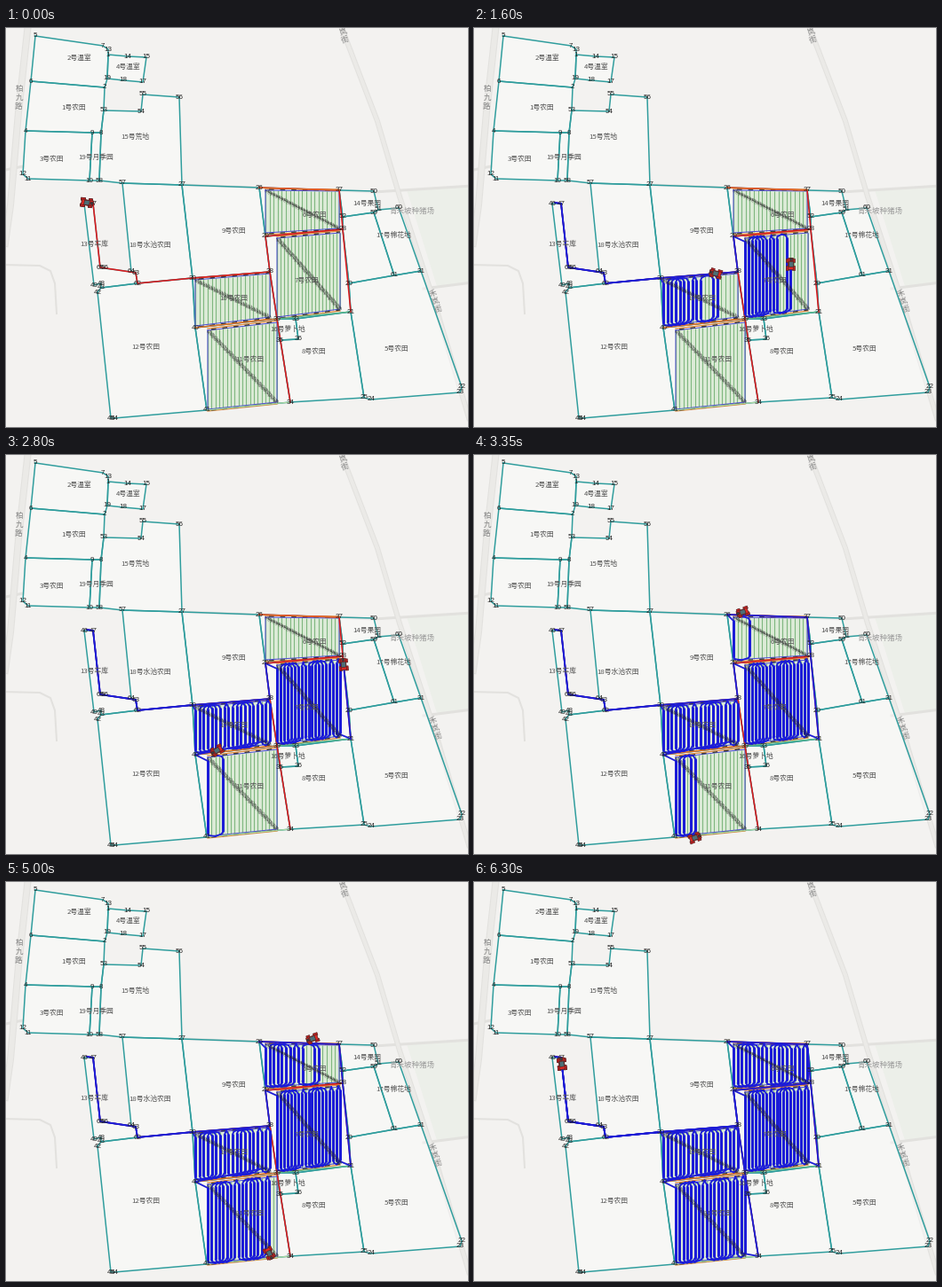
Write a matplotlib script that moves like this. It is 520 px wide and 450 px high and loops after 6.35 s.

```python
import numpy as np
import matplotlib.pyplot as plt
from matplotlib.animation import FuncAnimation
from matplotlib.collections import LineCollection, PolyCollection

W, H, DPI = 520, 450, 100
STEP, FRAMES = 50, 127
PX = 72 / DPI
CJK = "Noto Sans CJK JP"
TEAL, RED, BLUE = "#2f9d9d", "#dc1a1e", "#1c1cd8"
PASSES, BLOCK = 19, 8

NORTH = {
    5: (33, 9), 7: (109, 20), 13: (115, 24), 1: (115, 30), 14: (137, 32),
    15: (158, 33), 17: (154, 61), 18: (132, 59), 19: (114, 57), 2: (111, 67),
    6: (28, 60), 53: (110, 93), 54: (152, 94), 55: (154, 75), 56: (195, 78),
    4: (22, 116), 9: (97, 118), 8: (107, 118), 12: (19, 165), 11: (25, 170),
    10: (94, 172), 58: (105, 172), 57: (131, 175), 27: (198, 177),
    26: (285, 180), 37: (375, 183), 50: (414, 184), 51: (419, 205),
    59: (414, 208), 60: (442, 203), 52: (379, 213), 28: (379, 227),
}
SOUTH = {
    46: (88, 198), 47: (98, 198), 65: (106, 270), 66: (111, 271),
    64: (141, 275), 63: (146, 276), 62: (148, 288), 48: (107, 288),
    49: (99, 290), 43: (107, 293), 42: (103, 298), 45: (118, 440),
    44: (122, 440), 41: (226, 431), 30: (210, 282), 38: (297, 275),
    29: (292, 235), 40: (213, 338), 39: (305, 328), 33: (326, 328),
    36: (329, 351), 35: (308, 352), 34: (320, 422), 25: (403, 417),
    24: (411, 419), 23: (511, 411), 22: (513, 405), 31: (467, 274),
    61: (437, 279), 20: (386, 288), 21: (388, 320),
}
NODES = {**NORTH, **SOUTH}

PLOTS = [
    "5 7 13 1 19 2 6", "1 14 15 17 18 19", "6 2 53 8 9 4", "4 9 10 11 12",
    "9 8 58 10", "53 54 55 56 27 57 58 8", "57 27 30 62 63 64",
    "46 47 65 66 64 63 62 43 48 49", "42 43 62 30 40 41 44 45",
    "27 26 29 38 30", "30 38 39 40", "40 39 34 41", "26 37 52 28 29",
    "29 28 20 21 33 39 38", "37 50 51 59 52", "59 51 60 31 61",
    "52 59 61 20 28", "20 61 31 22 23 24 25 21", "39 35 36 33 21 25 34",
    "33 39 35 36",
]
ROUTES = ["47 65 63 62 30 38 39 34", "38 29 28", "26 37 28 21"]

NAMES = [
    ("2号温室", 82, 34), ("4号温室", 138, 44), ("1号农田", 76, 90),
    ("15号荒地", 145, 123), ("3号农田", 51, 148), ("19号月季园", 101, 146),
    ("9号农田", 256, 229), ("18号水池农田", 162, 245), ("13号车库", 99, 244),
    ("12号农田", 157, 360), ("10号农田", 256, 305), ("11号农田", 274, 374),
    ("7号农田", 338, 285), ("6号农田", 347, 211), ("8号农田", 346, 365),
    ("5号农田", 440, 362), ("14号果园", 406, 198), ("17号棉花地", 436, 234),
    ("16号萝卜地", 317, 340),
]

# corners: top left, top right, bottom left, bottom right
F10 = np.array([(213, 284), (297, 277), (213, 336), (297, 326)], float)
F11 = np.array([(227, 341), (305, 332), (227, 430), (305, 422)], float)
F7 = np.array([(305, 237), (376, 231), (305, 326), (376, 317)], float)
F6 = np.array([(292, 183), (375, 184), (292, 231), (375, 226)], float)


def nodes(text):
    return np.array([NODES[int(n)] for n in text.split()], float)


def pass_order():
    """Interleave each block so that turns skip half of its rows."""
    order = []
    for s in range(0, PASSES, BLOCK):
        m = min(BLOCK, PASSES - s)
        half = (m + 1) // 2
        for k in range(half):
            order += [s + k] + ([s + k + half] if k + half < m else [])
    return order


def row(field, k):
    tl, tr, bl, br = field
    u = k / (PASSES - 1)
    return tl + (tr - tl) * u, bl + (br - bl) * u


def sweep(field):
    """Vertices (x, y, marker shift, line width): five per pass with its turn."""
    pts = []
    order = pass_order()
    for i, k in enumerate(order):
        a, b = row(field, k)
        side = 1 if i % 2 == 0 else -1
        if side < 0:
            a, b = b, a
        pts += [(a[0], a[1] + 4 * side, 0, 3.0), (b[0], b[1] - 4 * side, 0, 1.8)]
        if i + 1 < len(order):
            c = row(field, order[i + 1])[side > 0]
            d = 1.5 * np.sign(c[0] - b[0])
            mid = (b + c) / 2
            pts += [(b[0] + d, b[1] - side, 3 * side, 1.8),
                    (mid[0], mid[1] + side, 6 * side, 1.8),
                    (c[0] - d, c[1] - side, 3 * side, 1.8)]
    return pts


def travel(text):
    return [(x, y, 0, 1.8) for x, y in nodes(text)]


class Machine:
    def __init__(self, pts, keys, ax):
        self.pts = np.array(pts, float)
        xy = self.pts[:, :2]
        self.dist = np.r_[0, np.cumsum(np.hypot(*np.diff(xy, axis=0).T))]
        times, verts = np.array(keys, float).T
        self.times = times
        self.marks = np.interp(verts, np.arange(len(pts)), self.dist)
        self.segs = np.stack([xy[:-1], xy[1:]], axis=1)
        self.trail = LineCollection([], colors=BLUE, zorder=6, capstyle="round",
                                    linewidths=self.pts[:-1, 3] * PX)
        ax.add_collection(self.trail)
        self.icon = PolyCollection([], zorder=12, linewidths=0.6 * PX,
                                   facecolors=ICON_COLORS, edgecolors="#4a2020")
        ax.add_collection(self.icon)

    def update(self, t):
        d = np.interp(t, self.times, self.marks)
        i = min(np.searchsorted(self.dist, d, side="right") - 1, len(self.segs) - 1)
        x, y, shift = (np.interp(d, self.dist, self.pts[:, c]) for c in range(3))
        segs = list(self.segs[:i])
        if d > 0:
            segs.append(np.array([self.pts[i, :2], (x, y)]))
        self.trail.set_segments(segs)
        dx, dy = self.segs[i][1] - self.segs[i][0]
        n = np.hypot(dx, dy) or 1
        rot = np.array([[dx, dy], [-dy, dx]]) / n
        self.icon.set_verts([p @ rot + (x, y + shift) for p in ICON])


def box(x0, y0, x1, y1):
    return np.array([(x0, y0), (x1, y0), (x1, y1), (x0, y1)], float)


ICON = [box(-7, -5, -2, -2), box(-7, 2, -2, 5), box(2, -5, 6, -2), box(2, 2, 6, 5),
        box(-6, -3, 7, 3), box(-3, -2.5, 3, 2.5), box(4, -1.5, 7, 1.5)]
ICON_COLORS = ["#c81e1e"] * 4 + ["#dd2a24", "#4c6f76", "#3b3b40"]

fig = plt.figure(figsize=(W / DPI, H / DPI), dpi=DPI, facecolor="#f3f2f0")
ax = fig.add_axes([0, 0, 1, 1])
ax.set_xlim(0, W)
ax.set_ylim(H, 0)
ax.axis("off")


def line(pts, color, width, z, **kw):
    x, y = np.array(pts, float).T
    ax.plot(x, y, color=color, lw=width * PX, zorder=z, **kw)


def label(x, y, text, size, color, z, **kw):
    ax.text(x, y, text, fontsize=size * PX, color=color, zorder=z,
            ha="center", va="center", **kw)


def street(name, x, y, dx, dy, angle):
    for i, ch in enumerate(name):
        label(x + i * dx, y + i * dy, ch, 8.5, "#858585", 3,
              family=CJK, rotation=angle)


# base map
ax.fill([452, 520, 520, 486], [183, 180, 287, 292], color="#ecefe9", zorder=0)
for pts, width in [([(25, -5), (14, 95), (5, 200), (-2, 250)], 8),
                   ([(376, -5), (418, 105), (443, 190), (484, 315), (524, 450)], 6),
                   ([(-5, 161), (19, 156)], 3),
                   ([(198, 177), (414, 185), (525, 178)], 3),
                   ([(-5, 267), (38, 268), (50, 274), (55, 288), (57, 322)], 2),
                   ([(470, 294), (525, 287)], 3)]:
    line(pts, "#e2e1de", width, 0.5)
    if width > 4:
        line(pts, "#ebeae7", width - 2, 0.6)
street("柏九路", 15, 69, -0.5, 9.5, 0)
street("岚街", 379, 4, 3, 9, 20)
street("禾岚街", 480, 299, 3.5, 9, 20)
label(457, 206, "青禾坡种猪场", 8.5, "#9a9a9a", 3, family=CJK)

# plots
for text in PLOTS:
    p = nodes(text)
    ax.fill(*p.T, color="white", alpha=0.4, lw=0, zorder=1)
    line(np.vstack([p, p[:1]]), TEAL, 1.5, 2)

# planned rows
for n, f in enumerate([F10, F11, F7, F6]):
    tl, tr, bl, br = f
    ax.fill(*np.array([tl, tr, br, bl]).T, color="#dcebd7", lw=0, zorder=3)
    rows = [row(f, k) for k in np.arange(0, PASSES - 0.9, 0.999)]
    ax.add_collection(LineCollection(rows, colors="#7fb77f", linewidths=1.1 * PX, zorder=3.1))
    line([tl, tr, br, bl, tl], "#4a4ad0", 1, 3.2)
    for a, b, s in [(tl, tr, -1), (bl, br, 1)]:
        line([a + (0, 2 * s), b + (0, 2 * s)], "#e08a3c", 1.3, 3.3)
        line([a + (4, s), b + (0, s)], "#3a3a3a", 1.4, 3.4, dashes=(4, 5))
    for j in range(2):
        u = (np.arange(28) + 0.5 * j + 0.3) / 28
        diag = tl + (br - tl) * u[:, None]
        ax.scatter(diag[:, 0], diag[:, 1], s=13, marker=f"${37 + 11 * n + 4 * j}$",
                   color="#222222", alpha=0.65, lw=0, zorder=8)
line(nodes("40 39"), "#e0702c", 1.3, 3.5)
line(nodes("26 37"), "#e0702c", 1.3, 4.5)
line(nodes("41 34"), "#a9d6a0", 1.3, 3.5)
line([(305, 328), (388, 320)], "#5fb98a", 1.3, 3.5)

for text in ROUTES:
    line(nodes(text), RED, 1.6, 4)
line([(91, 197), (98, 198)], RED, 1.6, 4)

for n, (x, y) in NODES.items():
    label(x, y, str(n), 8, "#222222", 9, family="Liberation Sans")
for text, x, y in NAMES:
    label(x, y, text, 7.8, "#555555", 9, family=CJK)

HOME = [(91, 197, 0, 1.8)]
left = Machine(
    HOME + travel("47 65 63 62 30") + sweep(F10) + travel("40") + sweep(F11)
    + travel("34 39 38 30 62 63 65 47"),
    [(0, 0), (1000, 34.8), (2200, 94.8), (3350, 122.6), (4250, 159), (5000, 180),
     (5320, 191), (5850, 195.6), (6300, 197.9)], ax)
right = Machine(
    HOME + travel("47 65 63 62 30 38 29") + sweep(F7) + travel("21 28 37 26")
    + sweep(F6) + travel("28 29 38 30 62 63 65 47"),
    [(0, 0), (1000, 38.45), (2200, 88.9), (3350, 112.2), (4250, 142), (5000, 162),
     (5750, 196), (6300, 202.9)], ax)


def draw(i):
    for m in (left, right):
        m.update(i * STEP)
    return left.trail, right.trail, left.icon, right.icon


anim = FuncAnimation(fig, draw, frames=FRAMES, interval=STEP, repeat=True,
                     repeat_delay=0, blit=False)
plt.show()
```
